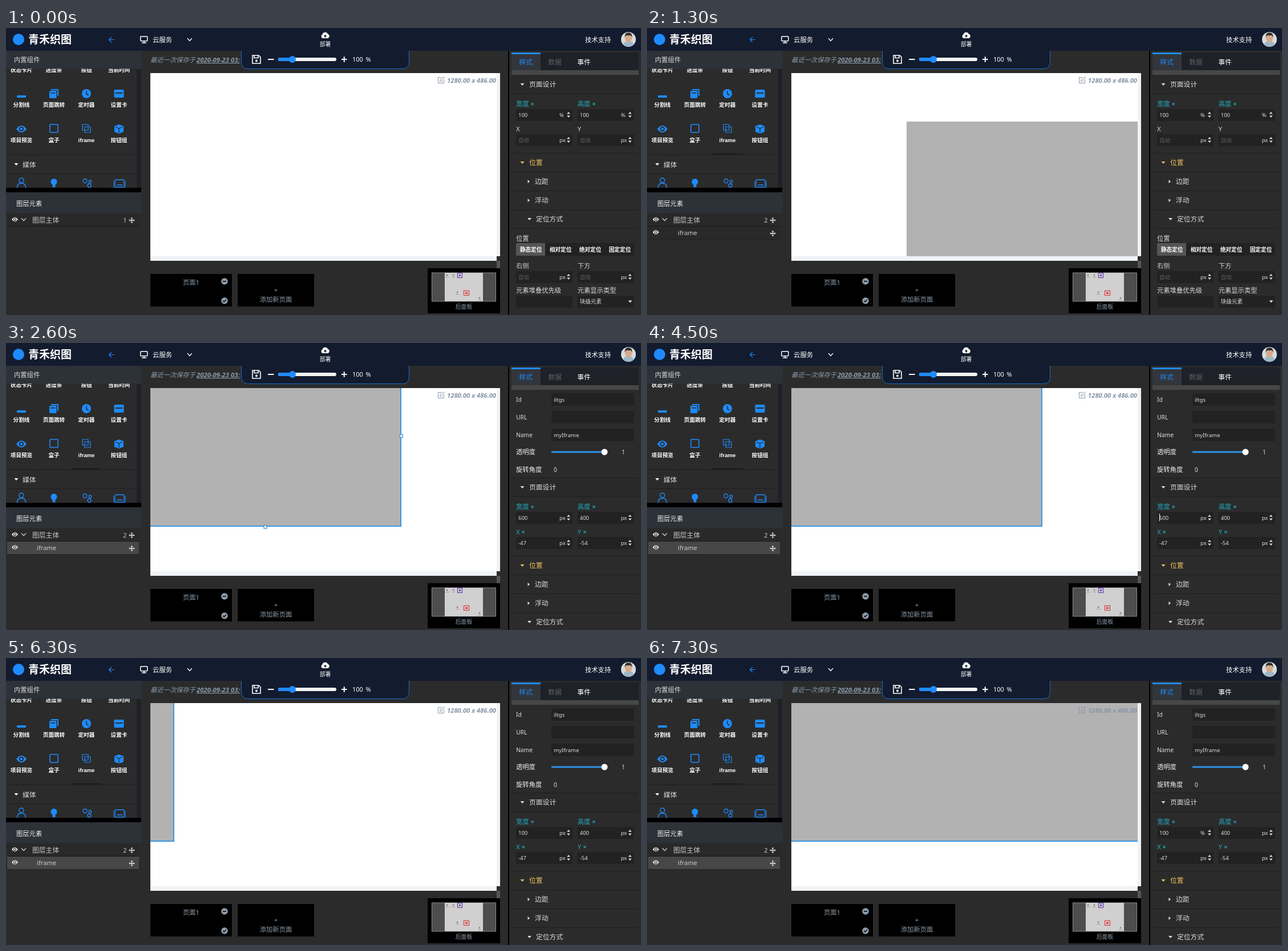
Recreate the animation shown at these times as an HTML page. Size 1113x503 px, loop 8 s.

```html
<!DOCTYPE html>
<html lang="zh-CN">
<head>
<meta charset="utf-8">
<style>
html, body { margin: 0; width: 100%; height: 100%; overflow: hidden; background: #2b2b2b; }
svg { display: block; font-family: "Noto Sans", "Noto Sans CJK SC", "Noto Sans CJK", sans-serif; }
text { white-space: pre; }
</style>
</head>
<body>
<svg id="stage" width="1113" height="503" viewBox="0 0 1113 503"></svg>
<script>
const BLUE = '#1e8bff', TEAL = '#22a9be', GREY = '#8c9cab', FIELD = '#222222', LINE = '#1f1f1f';
const MID = 'text-anchor="middle"', NO_FILL = 'none';

const rect = (x, y, w, h, fill, attrs = '') =>
  `<rect x="${x}" y="${y}" width="${w}" height="${h}" fill="${fill}" ${attrs}/>`;
const text = (x, y, s, size = 11.4, fill = '#ddd', attrs = '') =>
  `<text x="${x}" y="${y}" font-size="${size}" fill="${fill}" ${attrs}>${s}</text>`;
const circle = (x, y, r, fill, attrs = '') => `<circle cx="${x}" cy="${y}" r="${r}" fill="${fill}" ${attrs}/>`;
const shape = (d, fill) => `<path d="${d}" fill="${fill}"/>`;
const line = (d, color, width = 1) => `<path d="${d}" fill="none" stroke="${color}" stroke-width="${width}"/>`;
const group = (id, content, attrs = '') => `<g id="${id}" ${attrs}>${content}</g>`;
const at = (x, y, content) => `<g transform="translate(${x} ${y})">${content}</g>`;

const down = (x, y, fill = '#ddd') => shape(`M${x - 3.5} ${y - 2}h7l-3.5 4z`, fill);
const right = (x, y) => shape(`M${x - 1.5} ${y - 3}v6l3.5 -3z`, '#ddd');
const eye = (x, y, s, fill, hole) => at(x, y, `<g transform="scale(${s})">` +
  shape('M-9 0Q0 -12 9 0Q0 12 -9 0z', fill) + circle(0, 0, 4.2, hole) + circle(0, 0, 2.3, fill) + '</g>');
const move = (x, y) => at(x, y, line('M-4 0H4M0 -4V4', '#ddd', 1.3) +
  shape('M-2 -3h4l-2 -2.3zM-2 3h4l-2 2.3zM-3 -2v4l-2.3 -2zM3 -2v4l2.3 -2z', '#ddd'));

// Component icons, each centred on the origin
const icons = {
  divider: rect(-8, 3, 16, 4, BLUE, 'rx="1"'),
  pages: shape('M-5 -8H7q1 0 1 1V4H6V-6H-5z', BLUE) + rect(-8, -5, 12.5, 13, BLUE, 'rx="1.5"') + rect(-6, -2, 8.5, 1.5, '#2b2b2b'),
  clock: circle(0, 0, 8, BLUE) + line('M0 -5V0.5L3.5 3', '#2b2b2b', 1.6),
  card: rect(-8.5, -7, 17, 14, BLUE, 'rx="1.5"') + rect(-6.5, -2, 13, 2, '#2b2b2b'),
  eye: eye(0, 0, 1, BLUE, '#2b2b2b'),
  box: rect(-7, -8, 14, 14, NO_FILL, `stroke="${BLUE}" stroke-width="1.6" rx="1"`),
  iframe: line('M-7 -8H3V2H-7zM-3 -4H7V6H-3z', BLUE, 1.2),
  cube: shape('M0 -8L8 -5V5L0 8L-8 5V-5z', BLUE) + line('M-6 -3.5L0 -1L6 -3.5M0 -1V7', '#2b2b2b', 1.3)
};
const caption = (x, y, s) =>
  text(x, y, s, 9.6, '#fff', `${MID} font-weight="700" font-family="Liberation Sans, Noto Sans CJK SC, sans-serif"`);
const item = (x, y, icon, label) => at(x, y, icons[icon]) + caption(x, y + 22.5, label);

const columns = [27, 84, 141, 198];

function topBar() {
  return rect(0, 0, 1113, 40, '#131b2e') +
    circle(22, 20, 10, BLUE) + text(39, 27, '青禾织图', 19, '#fff', 'font-weight="700"') +
    line('M190 20.5H180.5M185 16L180.5 20.5L185 25', BLUE, 1.2) +
    rect(235.8, 14.8, 12, 8, NO_FILL, 'stroke="#fff" stroke-width="1.5" rx="1"') + line('M238 26H246M242 23V26', '#fff', 1.5) +
    text(257, 24.5, '云服务', 11.4, '#fff') + line('M318 18L322 22.5L326 18', '#fff', 1.3) +
    shape('M555 18a3.5 3.5 0 0 1 -.5 -6.5a5 5 0 0 1 9.5 -1a4 4 0 0 1 .5 7.5z', '#fff') +
    line('M559.5 17V12.5M557.5 14.5L559.5 12.5L561.5 14.5', '#131b2e', 1.2) +
    text(559.5, 31.5, '部署', 9.8, '#fff', MID) + text(1015, 24.5, '技术支持', 11.3, '#fff') +
    circle(1091, 20, 13, '#d5dcda') + shape('M1082 29q1 -6 9 -6t9 6q-9 8 -18 0z', '#9bb7cc') +
    `<ellipse cx="1091" cy="18" rx="6" ry="7.5" fill="#d9a98c"/>` + shape('M1084.5 17q-.5 -9 6.5 -9t6.5 9l-2 -4h-9z', '#33302f');
}

function leftPanel() {
  const names = [['divider', '分割线'], ['pages', '页面跳转'], ['clock', '定时器'], ['card', '设置卡'],
    ['eye', '项目预览'], ['box', '盒子'], ['iframe', 'iframe'], ['cube', '按钮组']];
  let s = ['状态卡片', '进度条', '按钮', '当前时间'].map((n, i) => caption(columns[i], 76.5, n)).join('');
  s += rect(0, 40, 237, 31.5, '#2d3239') + text(14, 60, '内置组件', 11.3);
  names.forEach(([icon, label], i) => {
    const x = columns[i % 4], y = i < 4 ? 115 : 177;
    s += line(`M${x - 27} ${y + 43.5}h54`, '#252525') + item(x, y, icon, label);
  });
  s += rect(229, 72, 8, 208, '#1e2127') + line('M0 222.5H229M0 255.5H229', LINE) +
    down(18, 239, '#fff') + text(29, 243.5, '媒体', 11.8) +
    circle(27, 267, 4, NO_FILL, `stroke="${BLUE}" stroke-width="1.5"`) + line('M19.5 280q0 -8 7.5 -8t7.5 8', BLUE, 1.5) +
    circle(84, 269.5, 5.5, BLUE) + rect(81.5, 274, 5, 5, BLUE) +
    [[138.5, 268, 3.5], [147.5, 269, 2.3], [146, 276, 3]].map(([x, y, r]) =>
      circle(x, y, r, NO_FILL, `stroke="${BLUE}" stroke-width="1.3"`)).join('') +
    rect(191, 266, 16, 13, NO_FILL, `stroke="${BLUE}" stroke-width="1.3" rx="1"`) +
    line('M189 268V280M209 268V280', BLUE) + line('M194.5 275H204', BLUE, 1.5) +
    rect(0, 280, 237, 8, '#000') + rect(0, 288, 237, 36, '#2d3239') + text(18, 312, '图层元素', 11.3, '#eee') +
    rect(2, 325, 231, 22, '#292929') + eye(15.5, 335.5, .62, '#eee', '#292929') + line('M27 333.5L31 337.5L35 333.5', '#ccc', 1.3) +
    text(46, 340.5, '图层主体', 11.8, '#c8c8c8') + move(220.5, 337) + line('M2 347.5H233', '#181818') +
    text(211.5, 340.5, '1', 11, '#c8c8c8', 'id="count" text-anchor="end"');
  return s + group('layer', rect(2, 348, 231, 22, '#292929', 'id="row"') + eye(15.5, 358, .62, '#eee', '#333') +
    text(54, 363, 'iframe', 11.2, '#ccc') + move(220.5, 360) + line('M2 370.5H233', '#222') +
    line('M115 220.5H168', '#161616', 1.5));
}

function editor() {
  const strong = 'font-weight="700" font-style="italic"';
  return text(253, 60, '最近一次保存于', 11.3, GREY, 'font-style="italic"') +
    text(334, 60, '2020-09-23 03:', 11.3, GREY, `${strong} text-decoration="underline"`) +
    shape('M412 40V59Q412 71.5 424 71.5H695Q707 71.5 707 59V40z', '#131b2e') +
    line('M412.5 40V59Q412.5 71.5 424 71.5H695Q706.5 71.5 706.5 59V40', '#1c6fca') +
    line('M432 48H443L446 51V62H432zM435 48V52.5H442V48', '#fff', 1.6) + circle(439, 57.5, 2, '#fff') +
    line('M459 55H469.5M588 55H597.5M592.75 50.2V59.8', '#fff', 2) +
    rect(477, 52, 102, 6, '#f4f4f4', 'rx="3"') + rect(477, 52, 25, 6, BLUE, 'rx="3"') + circle(502, 55, 6, BLUE) +
    text(607, 59, '100', 11, '#fff') + text(630.5, 59, '%', 11, '#fff') +
    rect(253, 79, 613, 329, '#eff3f6') + rect(253, 79, 607, 321, '#fff') +
    rect(860, 400, 6, 8, '#2b2b2b') + rect(860, 408, 6, 13, '#555') +
    `<clipPath id="page"><rect x="253" y="79" width="607" height="321"/></clipPath>` +
    `<g clip-path="url(#page)">${rect(0, 0, 478, 318, '#b2b2b2', 'id="frame"')}` +
    rect(0, 0, 476, 316, NO_FILL, 'id="border" stroke="#3b97e3" stroke-width="2"') + '</g>' +
    group('handles', [[693, 163], [454.5, 322.5]].map(([x, y]) =>
      rect(x - 2.5, y - 2.5, 5, 5, '#fff', 'stroke="#3b97e3" stroke-width="1.3"')).join('')) +
    line('M763 86.5H757.5V96.5H767.5V91M760.5 93.5L761 91L766.5 85.5L768.5 87.5L763 93z', '#8795a8') +
    text(859, 96, '1280.00 x 486.00', 11.2, '#8795a8', `${strong} text-anchor="end"`) +
    rect(253, 431, 143, 57, '#000') + text(324.5, 449.5, '页面1', 11.3, GREY, MID) +
    circle(383, 444, 5.8, GREY) + line('M380 444H386', '#000', 1.5) +
    circle(383, 478, 5.8, GREY) + line('M380.3 478L382.3 480L386 476', '#000', 1.4) +
    rect(406, 431, 134, 57, '#000') + text(473, 462.5, '+', 11.3, GREY, MID) + text(473, 480, '添加新页面', 11.3, GREY, MID) +
    rect(739, 421, 127, 79, '#000') + rect(746.5, 429, 112, 50, '#4d4d4d', 'stroke="#8a8a8a"') + rect(769, 429, 67, 50, '#d0d0d0') +
    rect(791.5, 429.5, 8, 8, NO_FILL, 'stroke="#6d4bab" stroke-width="1.3"') + rect(794, 432, 3, 3, '#6d4bab') +
    rect(802.5, 460.5, 9, 8, NO_FILL, 'stroke="#dc4545" stroke-width="1.3"') + rect(805, 463, 4, 3, '#dc4545') +
    [[773, 433], [784, 433], [791, 463], [830, 473]].map(([x, y]) => circle(x, y, 1.3, '#777') + rect(x - 3, y + 3, 6, 1, '#999')).join('') +
    text(802.5, 492, '后面板', 9.8, GREY, MID);
}

const spinner = y => shape(`M983 ${y - 1.5}h6l-3 -3.5zM983 ${y + 1.5}h6l-3 3.5z`, '#ddd');

// A labelled number field; column 0 or 1
function field(col, y, label, value, unit, options = {}) {
  const fill = options.set ? TEAL : '#ccc';
  return at(col * 107.7, 0, text(894, y - 0.5, label, 11.3, fill) +
    (options.set ? text(label.length > 1 ? 919.5 : 903.5, y, '×', 11, TEAL, 'font-weight="700"') : '') +
    rect(894, y + 5, 99, 21, FIELD) + (options.before || '') +
    text(898, y + 18.5, value, 9.5, value === '自动' ? '#606060' : '#ddd', options.id ? `id="${options.id}"` : '') +
    text(970, y + 18.5, unit, 9.5, '#ddd', options.id ? 'id="unit"' : '') + spinner(y + 15));
}

function sections(width, height, x, y, options) {
  const set = { set: true }, pos = x === '自动' ? {} : set;
  const heads = [[269, '边距'], [302, '浮动']];
  const lines = [115.5, 219.5, 252.5, 285.5, 318.5, 351.5].map(v => `M886 ${v}H1109`).join('');
  return rect(886, 83, 223, 32, '#292929') + line(lines, LINE) +
    down(905, 99) + text(917, 103, '页面设计', 11.8) +
    field(0, 137, '宽度', width[0], width[1], { ...set, ...options }) + field(1, 137, '高度', height[0], height[1], set) +
    field(0, 181, 'X', x, 'px', pos) + field(1, 181, 'Y', y, 'px', pos) +
    down(905, 236, '#f0c060') + text(917, 240, '位置', 11.8, '#f0c060') +
    heads.map(([v, n]) => right(916, v) + text(927, v + 4, n, 11.8)).join('') +
    down(917.5, 335) + text(929, 339, '定位方式', 11.8);
}

function rightPanel() {
  const modes = ['静态定位', '相对定位', '绝对定位', '固定定位'];
  const pagePanel = sections(['100', '%'], ['100', '%'], '自动', '自动') +
    text(894, 372.5, '位置', 11.3) + rect(894, 377, 207, 22, FIELD) + rect(894, 377, 51, 22, '#555') +
    modes.map((m, i) => text(920 + i * 52, 391.5, m, 9.7, '#fff', `${MID} font-weight="700"`)).join('') +
    field(0, 421, '右侧', '自动', 'px') + field(1, 421, '下方', '自动', 'px') +
    text(894, 464, '元素堆叠优先级', 11.3) + rect(894, 469, 99, 21, FIELD) +
    text(1001.7, 464, '元素显示类型', 11.3) + rect(1001.7, 469, 99, 21, FIELD) +
    text(1005.5, 483, '块级元素', 9.7) + down(1094, 479.5);
  const inputs = [['Id', 'iltgs'], ['URL', ''], ['Name', 'myIframe']].map(([label, value], i) =>
    text(894, 103 + i * 31, label, 10.3) + rect(956, 88 + i * 31, 145, 22, FIELD) + text(960, 102.5 + i * 31, value, 9.7)).join('');
  const selection = rect(898, 299 - 154, 5.5, 13, BLUE, 'id="picked"') + rect(898, 299 - 154, 1, 13, '#fff', 'id="caret"');
  const itemPanel = inputs + text(894, 195, '透明度', 11.3, '#eee') + rect(956, 189.5, 93, 3, '#2f93e6') +
    circle(1049, 191, 5.5, '#fff') + text(1079, 195, '1', 10.3) +
    text(894, 226, '旋转角度', 11.3, '#eee') + text(960, 226, '0', 10.3) + line('M886 236.5H1109', LINE) +
    at(0, 154, sections(['600', 'px'], ['400', 'px'], '-47', '-54', { id: 'width', before: selection }));
  const menu = rect(967, 317, 18.5, 41, '#2f2f2f', 'stroke="#666"') + rect(967, 317, 18.5, 14, BLUE, 'id="choice"') +
    ['px', '%', 'vw'].map((u, i) => text(976.3, 327.5 + i * 13.7, u, 9.5, '#fff', MID)).join('');
  return rect(880, 40, 2, 463, '#000') + rect(886, 43, 223, 31, '#1e2128') + rect(886, 43, 51, 31, '#32363c') +
    rect(886, 43, 51, 3, BLUE) + rect(886, 74, 223, 8, '#474747') +
    text(911, 64, '样式', 11.8, BLUE, MID) + text(962, 64, '数据', 11.8, '#5e6268', MID) + text(1013, 64, '事件', 11.8, '#fff', MID) +
    group('pagePanel', pagePanel) + group('itemPanel', itemPanel) + group('menu', menu);
}

const stage = document.getElementById('stage');
stage.innerHTML = leftPanel() + editor() + rightPanel() + topBar() +
  group('ghost', rect(0, 0, 53, 55, '#2b2b2b') + item(26.5, 15, 'iframe', 'iframe'), 'opacity="0.55"');

const el = id => document.getElementById(id);
const show = (id, on) => el(id).setAttribute('visibility', on ? 'visible' : 'hidden');
const place = (id, attrs) => Object.entries(attrs).forEach(([k, v]) => el(id).setAttribute(k, v));

// Drag path: time, x, y
const drag = [[200, 265, 190], [300, 417, 192], [500, 811, 280], [700, 811, 280], [1000, 277, 82], [1300, 428, 137]];
function dragPoint(t) {
  const i = Math.max(1, drag.findIndex(p => p[0] > t));
  const [a, b] = [drag[i - 1], drag[i]];
  const k = (t - a[0]) / (b[0] - a[0]);
  return [a[1] + (b[1] - a[1]) * k, a[2] + (b[2] - a[2]) * k];
}

function render(now) {
  const t = Math.floor(now % 8000 / 100) * 100;
  const during = (from, to) => t >= from && t < to;

  show('ghost', during(200, 1300));
  if (during(200, 1300)) place('ghost', { transform: `translate(${dragPoint(t)})` });

  const dropped = t >= 1300, selected = t >= 2500;
  show('layer', dropped);
  el('count').textContent = dropped ? 2 : 1;
  place('row', { fill: selected ? '#474747' : '#292929' });

  const x = t < 1600 ? 455 : 215, y = t < 1400 ? 164 : 4;
  const width = t < 6300 ? 478 : t < 7300 ? 80 : 660;
  place('frame', { x, y, width });
  place('border', { x: x + 1, y: y + 1, width: width - 2 });
  show('frame', dropped);
  show('border', selected);
  show('handles', during(2500, 4500));

  show('pagePanel', t < 2600);
  show('itemPanel', t >= 2600);
  show('caret', during(4500, 4900));
  show('picked', during(4900, 5800));
  el('width').textContent = t < 5800 ? '600' : '100';
  el('unit').textContent = t < 7300 ? 'px' : '%';
  show('menu', during(6400, 7300));
  place('choice', { y: t < 6600 ? 317 : 331 });
  requestAnimationFrame(render);
}
render(0);
</script>
</body>
</html>
```
